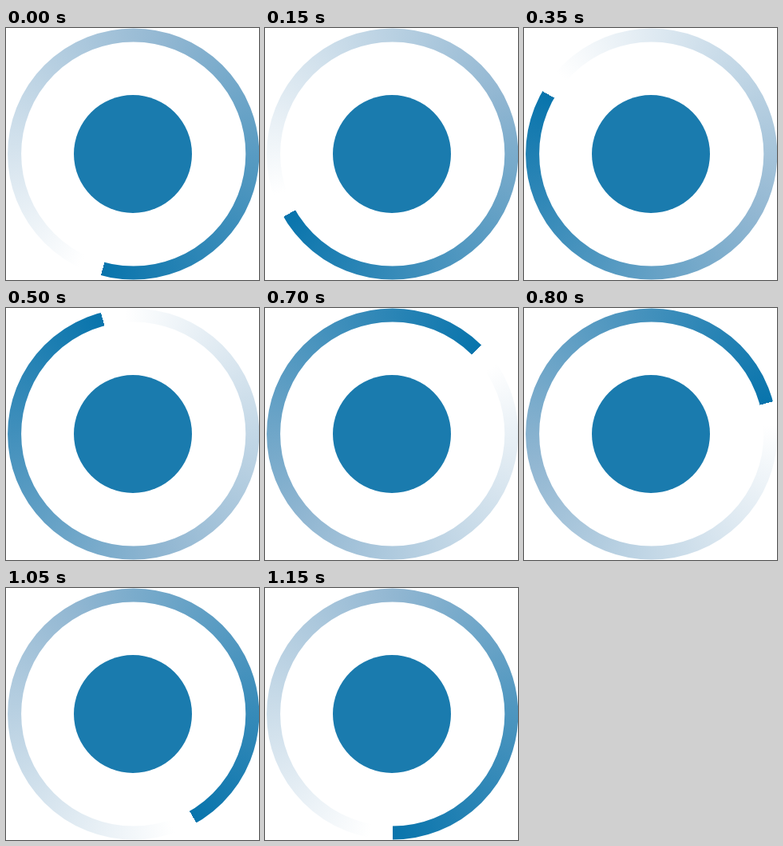
Recreate the animation shown at these times as an HTML page with a canvas. Size 317x316 px, loop 1200 ms.

```html
<!DOCTYPE html>
<html lang="en">
<head>
<meta charset="utf-8">
<title>Loading</title>
<style>
  html, body { margin: 0; width: 100%; height: 100%; overflow: hidden; background: #fff; }
  canvas { display: block; width: 317px; height: 316px; }
</style>
</head>
<body>
<canvas id="stage" width="317" height="316"></canvas>
<script>
const ctx = document.getElementById('stage').getContext('2d');
const LOOP = 1200, STEP = 50, STEPS = LOOP / STEP;
const CX = 159.7, CY = 158;
const RING = 149.1, THICKNESS = 17;
const FIRST_ANGLE = 105; // degrees clockwise from the right

function drawRing(head) {
  const fade = ctx.createConicGradient(head, CX, CY);
  fade.addColorStop(0, '#fff');
  fade.addColorStop(0.03, '#fff');
  fade.addColorStop(0.5, '#92b7d2');
  fade.addColorStop(1, '#0874ac');
  ctx.strokeStyle = fade;
  ctx.lineWidth = THICKNESS;
  ctx.beginPath();
  ctx.arc(CX, CY, RING, 0, Math.PI * 2);
  ctx.stroke();
}

function drawBadge() {
  ctx.fillStyle = '#1a7bae';
  ctx.beginPath();
  ctx.arc(159, 158, 74, 0, Math.PI * 2);
  ctx.fill();
}

function draw(ms) {
  const step = Math.floor((ms % LOOP) / STEP);
  const degrees = FIRST_ANGLE + step * 360 / STEPS;
  ctx.fillStyle = '#fff';
  ctx.fillRect(0, 0, 317, 316);
  drawRing(degrees * Math.PI / 180);
  drawBadge();
}

const start = performance.now();
function tick() {
  draw(performance.now() - start);
  requestAnimationFrame(tick);
}
tick();
</script>
</body>
</html>
```
